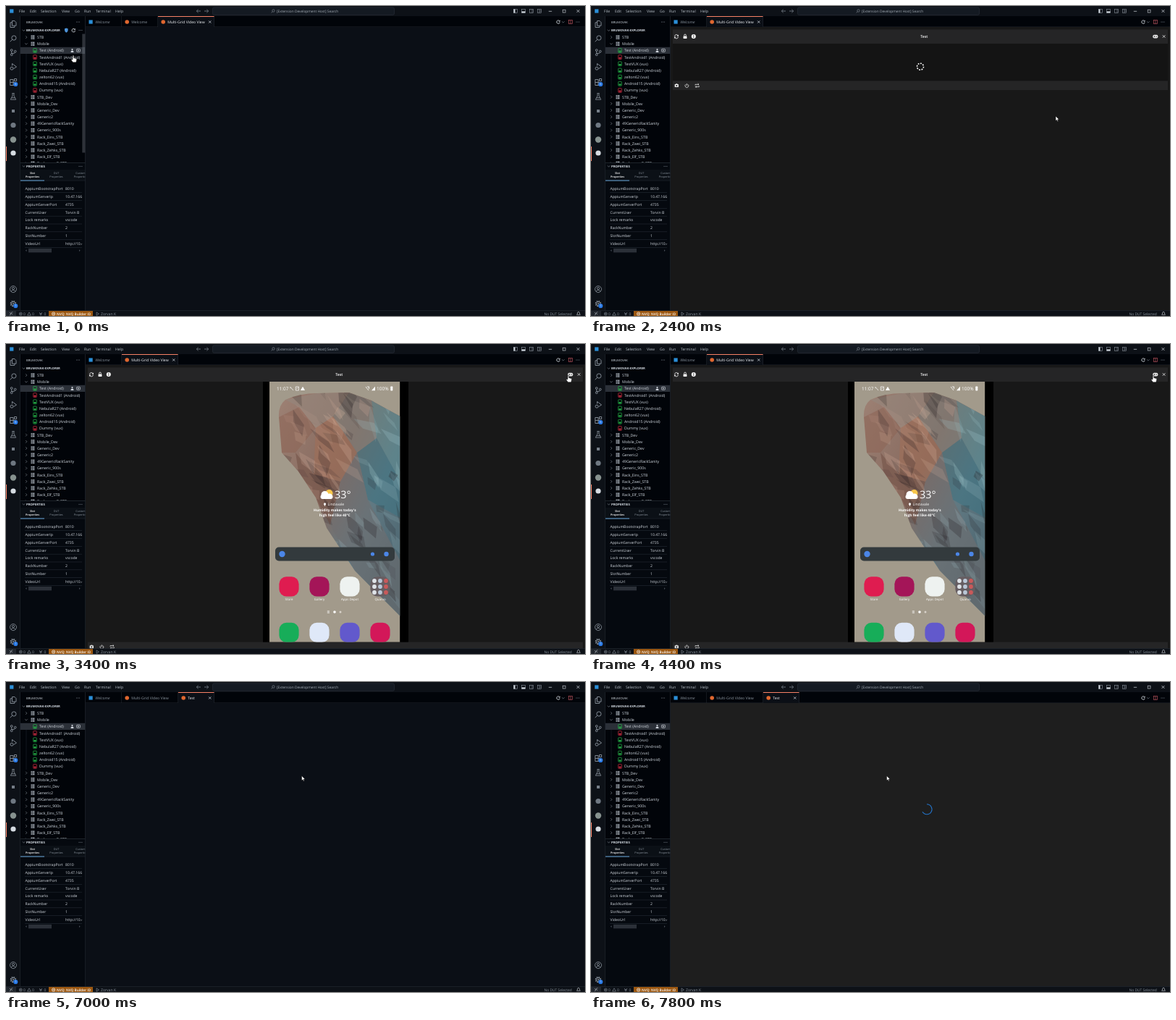
These frames come from a looping animation (800x428 px, 8000 ms). An HTML page:

```html
<!DOCTYPE html>
<html lang="en">
<head>
<meta charset="utf-8">
<title>Device explorer</title>
<style>
html, body { margin: 0; width: 100%; height: 100%; overflow: hidden; background: #0d1117; }
svg { display: block; width: 100vw; height: 100vh; }
text { font-family: "Open Sans", "Noto Sans", sans-serif; text-rendering: geometricPrecision; white-space: pre; }
</style>
</head>
<body>
<svg id="stage" viewBox="0 0 800 428"></svg>
<script>
const FG = '#d3d9e0', DIM = '#8b949e', LINE = '#262c34', EDITOR = '#0b0f16', SIDE = '#010409';
const LOOP = 8000, STEP = 200;

const rect = (x, y, w, h, fill, more = '') => `<rect x="${x}" y="${y}" width="${w}" height="${h}" fill="${fill}" ${more}/>`;
const circle = (x, y, r, fill, more = '') => `<circle cx="${x}" cy="${y}" r="${r}" fill="${fill}" ${more}/>`;
const shape = (d, fill, more = '') => `<path d="${d}" fill="${fill}" ${more}/>`;
const stroke = (d, color = FG, width = .7, more = '') => `<path d="${d}" fill="none" stroke="${color}" stroke-width="${width}" ${more}/>`;
const ring = (x, y, r, color, width, more = '') => circle(x, y, r, 'none', `stroke="${color}" stroke-width="${width}" ${more}`);
const frame = (x, y, w, h, color, width, more = '') => rect(x, y, w, h, 'none', `stroke="${color}" stroke-width="${width}" ${more}`);
const at = (x, y, body) => `<g transform="translate(${x} ${y})">${body}</g>`;
const group = (id, body) => `<g id="${id}">${body}</g>`;
const clipTo = (id, outline, body) => `<clipPath id="${id}">${outline}</clipPath><g clip-path="url(#${id})">${body}</g>`;
const text = (x, y, str, size = 5.25, fill = FG, more = '') =>
  `<text x="${x}" y="${y + size * .36}" font-size="${size}" fill="${fill}" ${more}>${str}</text>`;
const MID = 'text-anchor="middle"';

const cross = (x, y, r = 1.9, color = FG) => at(x, y, stroke(`M${-r} ${-r}L${r} ${r}M${r} ${-r}L${-r} ${r}`, color, .75));
const dots = (x, y) => [-2, 0, 2].map(d => circle(x + d, y, .5, DIM)).join('');
const chevron = (x, y, open) => at(x, y, stroke(open ? 'M-1.8-.9L0 .9L1.8-.9' : 'M-.9-1.8L.9 0L-.9 1.8', DIM, .6));
const reload = (x, y, r = 2.3, color = FG) =>
  at(x, y, stroke(`M${r * .7} ${-r * .7}A${r} ${r} 0 1 0 ${r} ${r * .2}M${r} ${-r}V${-r * .35}H${r * .3}`, color, .85));
const search = (x, y, r, w) => at(x, y, ring(r * .3, -r * .3, r, DIM, w) + stroke(`M${-r * .4} ${r * .4}L${-r * 1.4} ${r * 1.4}`, DIM, w));

function titleBar() {
  const menus = [['File', 18], ['Edit', 33], ['Selection', 48], ['View', 77], ['Go', 95], ['Run', 108], ['Terminal', 124], ['Help', 151]];
  const panes = [704, 715, 726, 737].map((x, i) => at(x, 7, frame(-2.6, -2.6, 5.2, 5.2, DIM, .6) +
    [rect(-2.5, -2.5, 2, 5, FG), rect(-2.5, .4, 5, 2, FG), stroke('M.9-2.5V2.5', DIM, .6), stroke('M0-2.5V2.5M0 0H2.5', DIM, .6)][i])).join('');
  return rect(0, 0, 800, 14, '#0d1117') + rect(5.2, 4.4, 5.2, 5.2, '#2b8fd8') +
    menus.map(([name, x]) => text(x, 7, name, 5.1, '#b9c1c9')).join('') +
    at(266, 7, stroke('M3 0H-2.5M-.4-2.2L-2.7 0L-.4 2.2', DIM)) +
    at(277, 7, stroke('M-3 0H2.5M.4-2.2L2.7 0L.4 2.2', DIM)) +
    rect(285.5, 2, 251, 10.3, '#141a22', 'rx="2" stroke="#2b323b" stroke-width=".6"') +
    search(369, 7, 1.7, .6) + text(374, 7, '[Extension Development Host] Search', 4.85, '#a7afb8') + panes +
    stroke('M749.8 7.3H754.2') + frame(769.2, 5.2, 3.8, 3.8, FG, .6) + cross(790.5, 7);
}

function activityBar() {
  const icons = [
    [25, stroke('M-1.5-4.5H2L4-2.3V2.2H-1.5ZM-1.5-2.2H-4V4.5H1.8V2.2', DIM, .9)],
    [45, search(0, 0, 3.1, .9)],
    [64, ring(-2.3, -3, 1.4, DIM, .9) + ring(-2.3, 3.2, 1.4, DIM, .9) + ring(2.7, -1.3, 1.4, DIM, .9) + stroke('M-2.3-1.6V1.8M2.7 .1Q2.5 1.7-2 1.5', DIM, .9)],
    [84, stroke('M-1.5-1.5V-4.5L4.5 0L.5 2.6', DIM, .9) + ring(-2, 2.2, 2, DIM, .9)],
    [105, stroke('M-4.2-3.5H0V4.5H-4.2ZM-4.2 .5H4V4.5H0M1.5-4.5H4.6V-1.4H1.5Z', DIM, .9)],
    [125, stroke('M-1.6-4.4H1.6M-1-4.4V-1L-3.7 4.2H3.7L1-1V-4.4M-2.5 1.7H2.5', DIM, .8)],
    [145, rect(-2, -2, 4, 4, '#747d87')],
    [164.5, circle(0, 0, 3.6, '#6f7882')],
    [184.5, circle(0, 0, 4.2, '#87928f')],
    [203, circle(0, 0, 3.6, '#d6dce2')],
    [391, ring(0, 0, 4.5, DIM, .8) + ring(0, -1.1, 1.6, DIM, .8) + stroke('M-3 3Q0-1 3 3', DIM, .8)],
    [411, ring(0, 0, 3.5, DIM, 1.6, 'stroke-dasharray="1.6 1.15"') + ring(0, 0, 2.6, DIM, .8) + circle(0, 0, 1, DIM)]
  ];
  const badge = (y, n) => circle(13.3, y, 3.1, '#2878e4') + text(13.3, y, n, 3.8, '#fff', MID);
  return rect(0, 14, 20, 407, '#0d1117') + icons.map(([y, body]) => at(10, y, body)).join('') +
    badge(108, 6) + badge(414, 1) + rect(0, 194, 1, 20, '#f78166') + rect(19.5, 14, .5, 407, LINE);
}

function explorer() {
  const groups = 'STB,Mobile,STB_Dev,Mobile_Dev,Generic_Dev,Generic2,49GenericRackSanity,Generic_900s,Rack_Eins_STB,Rack_Zwei_STB,Rack_Zehks_STB,Rack_Elf_STB,Rack_zwoelf_STB'.split(',');
  const devices = ['Test (Android)', 'TestAndroid1 (Android)', 'TestVUX (vux)', 'NebulaR27 (Android)', 'zelton62 (vux)', 'Android15 (Android)', 'Dummy (vux)'];
  const rowY = i => 43.1 + i * 9.17;
  const rack = y => at(37, y, [-2, 0, 2].map(d => rect(-2.5, d - .6, 5, 1.25, '#b5bdc6') + rect(-.5, d - .6, .5, 1.25, SIDE)).join(''));
  const device = (y, color) => at(40, y, frame(-2.3, -2.9, 4.6, 5.8, color, .7, 'rx=".6"') + rect(-1.5, .2, 3, 1.9, color));
  const groupRow = (name, i) => {
    const y = rowY(i < 2 ? i : i + devices.length);
    return chevron(28, y, i === 1) + rack(y) + text(43, y, name);
  };
  const deviceRow = (name, i) => device(rowY(i + 2), i === 1 || i === 6 ? '#d62f43' : '#27b94a') + text(46, rowY(i + 2), name);
  const tree = rect(20, 56.8, 89.5, 9.2, '#2b3038') + rect(27.8, 57, .4, 64, '#30363d') +
    groups.map(groupRow).join('') + devices.map(deviceRow).join('') +
    circle(91.5, 60, 1.1, FG) + shape('M89.6 64V62.7Q91.5 60.4 93.4 62.7V64Z', FG) +
    frame(97.6, 59.3, 4.8, 4, FG, .7, 'rx=".7"') + shape('M99.2 60.2L101.3 61.4L99.2 62.6Z', FG);
  return rect(20, 14, 89.5, 407, SIDE) + text(28, 22, 'BRUMOVAK', 4.2) + dots(99.5, 22) +
    chevron(24.5, 33.6, true) + text(28, 33.6, 'BRUMOVAK-EXPLORER', 4.2, FG, 'font-weight="700"') +
    clipTo('tree', rect(20, 38, 89.5, 178), tree) +
    group('hover', shape('M81 31.2L83.3 30.5L85.6 31.2V34Q85 36 83.3 36.8Q81.6 36 81 34Z', '#4d93d9') + reload(93.3, 33.6) + dots(103, 33.6) +
      rect(105.3, 38.5, 4.2, 164, '#8b949e', 'opacity=".32"'));
}

function properties() {
  const rows = [['AppiumBootstrapPort', '8010'], ['AppiumServerIp', '10.47.166'], ['AppiumServerPort', '4735'], ['CurrentUser', 'Torvin B'],
    ['Lock remarks', 'vscode'], ['RackNumber', '2'], ['SlotNumber', '1'], ['VideoUrl', 'http://10.4']];
  const heads = [['Slot', 'Properties', 36.5], ['DUT', 'Properties', 69.5], ['Custom', 'Properties', 103]];
  const headRow = ([a, b, x], i) => [a, b].map((s, k) =>
    text(x, 231 + k * 4.6, s, 3.8, i ? DIM : '#fff', MID + (i ? '' : ' font-weight="600"'))).join('');
  const cellRow = ([key, value], i) => {
    const y = 252.2 + i * 10.83;
    return text(26.5, y, key, 5.1) + text(82, y, value, 5.1) + rect(26, y + 5.2, 79, .5, '#29303a');
  };
  return rect(20, 216, 89.5, 205, '#05090f') + rect(20, 216, 89.5, .6, '#30363d') +
    chevron(24.5, 221.2, true) + text(28, 221.2, 'PROPERTIES', 4.35, FG, 'font-weight="700"') + dots(103, 221.2) +
    rect(20, 226, 89.5, 15, '#0b1016') + clipTo('heads', rect(20, 226, 89.5, 16), heads.map(headRow).join('')) +
    rect(20, 240.8, 89.5, .5, LINE) + rect(20, 240.5, 33, 1, '#69a8dc') +
    clipTo('cells', rect(20, 243, 85, 95), rows.map(cellRow).join('')) + rect(31, 334.8, 32, 5.5, '#2b3038') +
    shape('M28.5 336.2V339L26.9 337.6Z', '#4a515a') + shape('M101 336.2V339L102.6 337.6Z', '#4a515a') + rect(109.2, 14, .6, 407, LINE);
}

function statusBar() {
  return rect(0, 420.5, 800, 8, '#0d1117') + rect(0, 420.3, 800, .6, LINE) + rect(0, 421, 14, 7, '#21262d') +
    stroke('M5 426.8L7 425L5 423.2M9 422.2L7.2 424L9 425.8', FG, .6) +
    ring(20.3, 425, 2, DIM, .6) + cross(20.3, 425, .8, DIM) + text(24, 425, '0', 5, DIM) +
    stroke('M32 422.8L34.4 427H29.6Z', DIM, .6) + text(36, 425, '0', 5, DIM) +
    stroke('M46 423L48 425V427.5M50 423L48 425M46 424.8Q48 426.6 50 424.8', DIM, .6) + text(52.5, 425, '0', 5, DIM) +
    rect(59, 421, 61, 7, '#9c5710') + ring(65.7, 425, 2.2, '#fff', .7) + cross(65.7, 425, .8, '#fff') +
    text(70, 425, 'NVQ: NVQ Builder ID', 4.75, '#fff', 'font-weight="600"') +
    stroke('M125 422.8L128.4 425L125 427.2Z', DIM, .6) + text(131, 425, 'Zorvan K', 5.1, DIM) + text(743.5, 425, 'No DUT Selected', 4.9, DIM) +
    stroke('M788.6 426.3H793.4L792.5 425V423.8Q792.3 422.2 791 422.2T789.5 423.8V425Z', FG, .6);
}

function tabStrip(id, tabs) {
  const body = tabs.map(([x, end, name, style]) => {
    const active = style === 'active';
    return rect(x, 14, end - x, 15, active ? EDITOR : SIDE) + (active ? rect(x, 14, end - x, 1, '#f78166') : rect(x, 28.6, end - x, .5, LINE)) +
      rect(end - .5, 14, .5, 15, LINE) + (style === 'italic' ? rect(x + 4.5, 19.4, 5.2, 5.2, '#2b8fd8') : circle(x + 7.2, 22, 2.8, '#e0672f')) +
      text(x + 13.2, 22, name, 5.15, active ? '#f0f3f6' : DIM, style === 'italic' ? 'font-style="italic"' : '') +
      (active ? cross(end - 6.3, 22, 1.6) : '');
  }).join('');
  return group(id, body);
}

function randomizer(seed) {
  return () => (seed = seed * 16807 % 2147483647) / 2147483647;
}

// Long tinted shards that follow the slant of the rock.
function shards(count) {
  const random = randomizer(71);
  return Array.from({ length: count }, () => {
    const x = 372 + random() * 175, y = 60 + random() * 300;
    const angle = .35 + random() * 1.1, length = 14 + random() * 42, width = 4 + random() * 13;
    const dx = Math.cos(angle), dy = Math.sin(angle);
    const corners = [[-length / 2, 0], [-length * .1, width / 2], [length / 2, width * .2], [length * .15, -width / 2]];
    const points = corners.map(([a, b]) => `${(x + a * dx - b * dy).toFixed(1)} ${(y + a * dy + b * dx).toFixed(1)}`);
    const tint = random() < .5 ? '#241d20' : x + y / 3 > 535 ? '#9fc3c9' : '#d9b5a0';
    return shape(`M${points.join('L')}Z`, tint, `opacity="${(.08 + random() * .2).toFixed(2)}"`);
  }).join('');
}

function crystal() {
  const outline = shape('M377 101Q376 85 386 77Q405 68 430 68L474 67L505 78L545 100V376L482 313L443 254L428 212L404 176L381 150Z', '#000');
  const planes = [
    ['M377 101L405 87L428 116L400 150L381 150Z', '#8e6658', .6], ['M386 77L430 68L474 67L452 100L428 116L405 87Z', '#94877e', .6],
    ['M428 116L452 100L485 150L462 190L425 180Z', '#a06e57', .6], ['M474 67L505 78L512 130L485 150L452 100Z', '#7f7c77', .7],
    ['M505 78L545 100V190L512 130Z', '#5d8b92', .6], ['M485 150L512 130L545 190V240L500 215Z', '#3f7482', .6],
    ['M400 150L425 180L462 190L448 250L428 212L404 176Z', '#765449', .6], ['M462 190L485 150L500 215L545 300V376L482 313L448 250Z', '#706e70', .6]
  ];
  return clipTo('rock', outline, rect(364, 60, 181, 320, 'url(#stone)') + planes.map(([d, color, alpha]) => shape(d, color, `opacity="${alpha}"`)).join('') + shards(110));
}

function phone() {
  const white = '#fff', blue = '#4b86e8', bold = MID + ' font-weight="700"';
  const app = (x, y, color) => rect(x - 13.6, y - 13.8, 27.2, 27.2, color, 'rx="10"');
  const appX = i => 391 + i * 42;
  const row = (y, colors) => colors.map((color, i) => app(appX(i), y, color)).join('');
  const folder = Array.from({ length: 9 }, (_, i) => circle(509 + i % 3 * 8, 327 + Math.floor(i / 3) * 8, 2.9, ['#dfe3e8', '#c9595a', '#b9c6d6'][i * 2 % 3])).join('');
  const labels = ['Store', 'Gallery', 'Apps Depot', 'Quarvo'];
  const status = text(374, 61.5, '11:07', 6.4, white, 'font-weight="500"') +
    stroke('M393 59.5L397 64M393 59.3V61.2M400.3 59H404.5V64H400.3ZM401.5 62L403.5 60', white, .7) + shape('M410 58.8L413 64H407Z', white) +
    stroke('M497 59L501 64M499 59H501.5V62', white, .8) + shape('M505 64.3L510 58.8V64.3Z', white) +
    text(512, 61.5, '100%', 6.6, white, 'font-weight="500"') + rect(531.3, 58.5, 3, 6, white, 'rx=".7"');
  const weather = circle(446.5, 206, 5, '#f7c64a') + circle(440.5, 208, 5, white) + circle(447, 210.3, 3.7, white) + rect(434.5, 208, 17, 6, white, 'rx="3"') +
    text(454, 208, '33°', 14.4, white) + circle(440.5, 220.7, 1.5, white) + shape('M439.2 221.5L440.5 224L441.8 221.5Z', white) +
    text(444.5, 221.3, 'Lindavale', 5.1, white) +
    text(454.3, 229, "Humidity makes today's", 4.85, white, bold) + text(454.3, 236.2, 'high feel like 40°C', 4.85, white, bold);
  const dock = rect(372, 280.5, 165, 19, '#333a3d', 'rx="5"') + circle(381.5, 290, 4.2, blue) + circle(506.5, 290, 2.6, blue) + circle(525.5, 290, 3.2, blue) +
    row(335, ['#df1c50', '#a41558', '#eef2f0', '#665d61']) + folder +
    labels.map((name, i) => text(appX(i), 352.4, name, 4.4, white, MID)).join('') +
    stroke('M443.8 368.7H447M443.8 370H447M443.8 371.3H447', white, .6) + circle(454, 370, 1.8, white) + circle(462, 370, 1.5, '#d7d1c9') +
    row(398.5, ['#17ad59', '#dfe8f8', '#6259cc', '#d31759']);
  return `<linearGradient id="stone" x1=".1" y1="0" x2="1" y2=".8"><stop stop-color="#9d8174"/><stop offset=".45" stop-color="#86695e"/><stop offset=".7" stop-color="#617982"/><stop offset="1" stop-color="#4a646f"/></linearGradient>` +
    rect(355, 52, 201, 359.5, '#000') + clipTo('screen', rect(364, 52, 180.2, 359.5), rect(364, 52, 181, 360, '#a29a8b') + crystal() + status + weather + dock);
}

function gridView() {
  const header = rect(113, 32.5, 684, 19.5, '#252526') +
    at(118, 42.2, stroke('M-2.5-.5A2.5 2.5 0 0 1 2-1.6M2.5 .5A2.5 2.5 0 0 1-2 1.6', '#fff', .8) + shape('M2.9-2.7V-.4H.6ZM-2.9 2.7V.4H-.6Z', '#fff')) +
    rect(127.6, 41.4, 4.8, 3.6, '#fff', 'rx=".5"') + stroke('M128.6 41.5V40.5A1.4 1.4 0 0 1 131.4 40.5V41.5', '#fff', .8) +
    circle(141.8, 42, 3, '#fff') + rect(141.4, 41.5, .9, 2.4, '#222') + circle(141.85, 40.4, .55, '#222') +
    text(460.3, 42.2, 'Test', 5.2, '#fff', MID + ' font-weight="600"') +
    rect(776.2, 39.8, 7.2, 4.7, '#e9e9e9', 'rx="2.2"') + stroke('M777.5 42.1H779.5M778.5 41.1V43.1', '#222', .6) + circle(781.3, 42.1, .7, '#222') +
    cross(791.6, 42, 1.8, '#fff');
  const tools = rect(115.7, 108, 5.2, 4, '#eee', 'rx=".5"') + rect(117.2, 107.3, 2.2, 1, '#eee') + circle(118.3, 110, 1.1, '#252526') +
    stroke('M130.9 108.2A2.4 2.4 0 1 0 133.9 108.2M132.4 107V110', '#eee', .75) +
    stroke('M144 109.5V108.3H149M147.7 107L149 108.3L147.7 109.6M149.3 110.2V111.6H144.3M145.6 110.3L144.3 111.6L145.6 112.9', '#eee', .75);
  const spinner = ring(0, 0, 4.5, '#fff', 1.6, `pathLength="16" stroke-dasharray="1.1 .9"`);
  return group('grid', rect(110, 29, 690, 391.3, '#181818') + header +
    group('loading', rect(113, 52, 684, 51, '#141414') + rect(113, 103.5, 684, 12.5, '#252526') + tools + at(455, 83.7, group('spinner', spinner))) +
    group('video', rect(113, 52, 684, 360, '#181818') + rect(113, 411.5, 684, 9, '#252526') + phone() + at(0, 308.3, tools)));
}

function editor() {
  return rect(110, 14, 690, 15, SIDE) + rect(110, 28.6, 690, .5, LINE) +
    tabStrip('tabsA', [[110, 160, 'Welcome', 'italic'], [160, 210, 'Welcome', 'plain'], [210, 288, 'Multi-Grid Video View', 'active']]) +
    tabStrip('tabsB', [[110, 160, 'Welcome', 'italic'], [160, 238, 'Multi-Grid Video View', 'active']]) +
    tabStrip('tabsC', [[110, 160, 'Welcome', 'italic'], [160, 238, 'Multi-Grid Video View', 'plain'], [238, 288, 'Test', 'active']]) +
    group('tabClose', cross(203.5, 22, 1.6)) +
    reload(763, 22, 2.2) + chevron(769.8, 22.2, true) + frame(777.6, 19.6, 4.8, 4.8, '#b5515b', .7) + stroke('M780 19.6V24.4', '#b5515b', .7) + dots(790, 22) +
    rect(110, 29, 690, 391.3, EDITOR) + gridView() +
    group('popup', rect(110, 29, 690, 391.3, '#1e1e1e') + at(464, 175.7, group('arc', stroke('M0-7A7 7 0 1 1-6 3.6', '#2474ca', 1.1))));
}

const pointer = group('arrow', shape('M0 0V6.6L1.6 5.2L2.6 7.5L3.7 7L2.7 4.8H4.8Z', '#fff', 'stroke="#000" stroke-width=".5"')) +
  group('hand', shape('M-.8 .6Q0-.5 .8 .6V3.7L4.2 4.6Q5 5 4.6 7L3.8 9.8H-.6L-3 6.2Q-2.6 5-1 6Z', '#fff', 'stroke="#000" stroke-width=".5"'));

const byId = id => document.getElementById(id);
byId('stage').innerHTML = rect(0, 0, 800, 428, EDITOR) + titleBar() + explorer() + properties() + activityBar() + editor() + statusBar() + group('cursor', pointer);

const path = [[0, 93, 68], [200, 101, 64], [600, 176, 44], [1000, 213, 30], [1200, 221, 27], [1400, 203, 20], [1600, 203, 20],
  [2400, 642, 152], [2800, 706, 100], [3200, 777, 43], [4600, 777, 43], [4800, 778, 41.5], [5200, 772, 48], [5800, 708, 76], [6400, 408.5, 129.5], [LOOP, 408.5, 129.5]];

function cursorAt(t) {
  const i = path.findIndex(p => p[0] > t);
  const [t0, x0, y0] = path[i - 1], [t1, x1, y1] = path[i];
  const k = (t - t0) / (t1 - t0);
  return [x0 + (x1 - x0) * k, y0 + (y1 - y0) * k];
}

const show = (id, on) => { byId(id).style.display = on ? '' : 'none'; };
const turn = (id, angle) => byId(id).setAttribute('transform', `rotate(${angle})`);

function draw(now) {
  const t = Math.floor(now % LOOP / STEP) * STEP;
  const within = (a, b) => t >= a && t < b;
  const hand = t < 200 || within(3200, 4800);
  show('hover', t < 400);
  show('tabsA', t < 1800);
  show('tabsB', within(1800, 4800));
  show('tabsC', t >= 4800);
  show('tabClose', within(1400, 1800));
  show('grid', within(1800, 4800));
  show('loading', t < 3000);
  show('video', t >= 3000);
  show('popup', t >= 7200);
  show('hand', hand);
  show('arrow', !hand);
  turn('spinner', (t - 2400) * .36);
  turn('arc', (t - 7800) * .36);
  byId('cursor').setAttribute('transform', `translate(${cursorAt(t)})`);
}

const start = performance.now();
function tick() {
  draw(performance.now() - start);
  requestAnimationFrame(tick);
}
tick();
</script>
</body>
</html>
```
